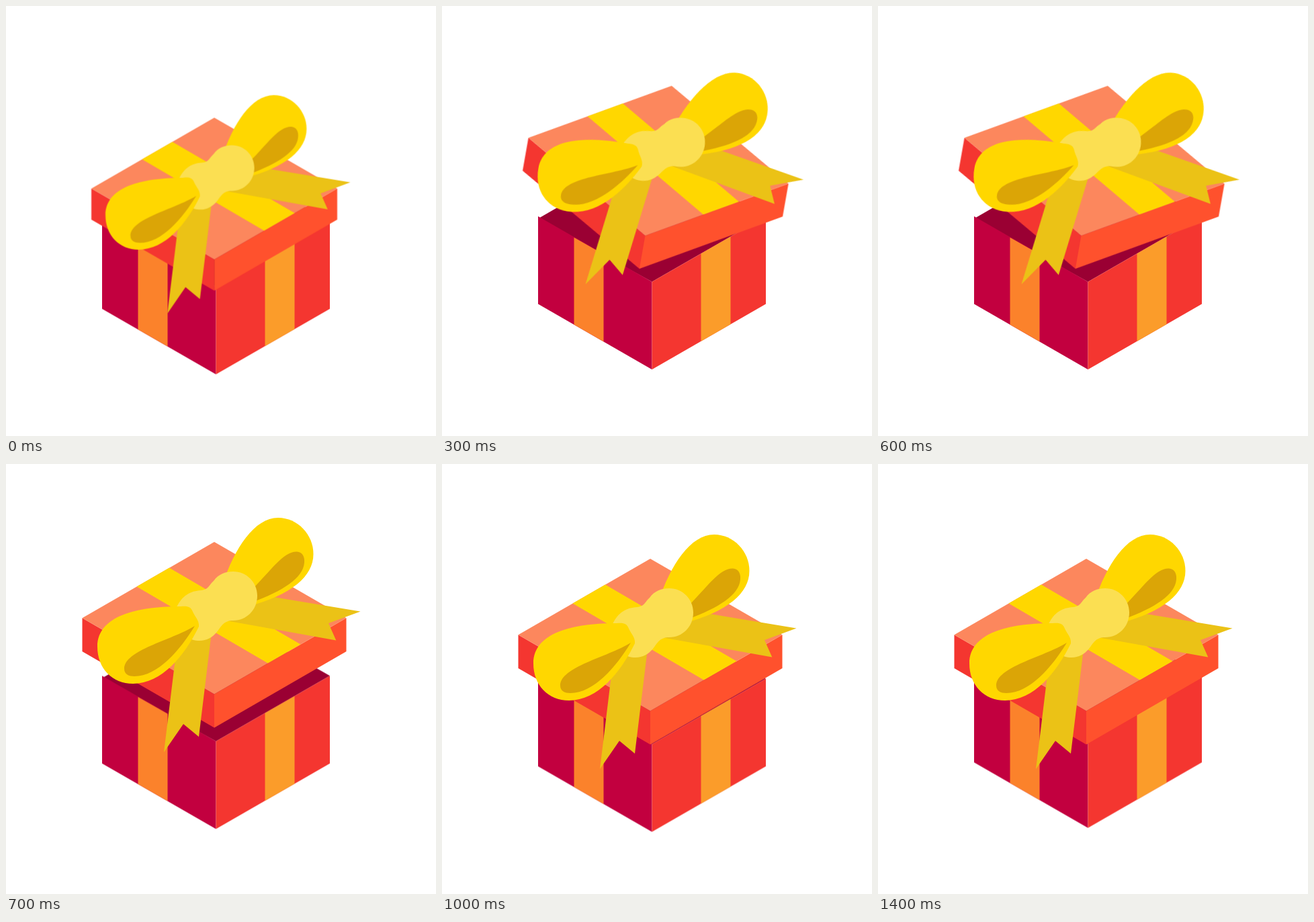
These frames come from a looping animation (640x640 px, 2.4 s). An HTML page:

```html
<!DOCTYPE html>
<html lang="en">
<head>
<meta charset="utf-8">
<title>Gift box</title>
<style>
  html, body { margin: 0; width: 100%; height: 100%; overflow: hidden; background: #fff; }
  svg { display: block; width: 100vw; height: 100vh; }
  .gold { fill: #ffd700; }
  .shade { fill: #dba506; }
  .tail { fill: #ebc216; }
</style>
</head>
<body>
<svg viewBox="0 0 640 640">
  <g id="box">
    <path fill="#9a0033" d="M143 316.5 314.5 217.5 482 313 312.5 410.5Z"/>
    <path fill="#c2003f" d="M143 313 312.5 410.5V541L143 443.5Z"/>
    <path fill="#f43630" d="M312.5 410.5 482 313V443.5L312.5 541Z"/>
    <path fill="#fb822b" d="M196.5 344.5 240.5 369.5V499.5L196.5 474.2Z"/>
    <path fill="#fb9c2a" d="M385.5 368.5 429.5 343.2V473.7L385.5 499Z"/>
  </g>
  <g id="lid">
    <path fill="#f43630" d="M113.5 254.3 310 367.6V417.5L113.5 304Z"/>
    <path fill="#ff512d" d="M310 367.6 506.5 254.3V304L310 417.5Z"/>
    <path fill="#fc875d" d="M113.5 254.3 310 141 506.5 254.3 310 367.6Z"/>
    <path class="gold" d="M194.5 207.6 243 179.6 438.5 293.5 389.7 321.6Z"/>
    <path class="tail" d="M350 215 527.5 244.5 480 262 491.3 287.5 330 258.5Z"/>
    <path class="tail" d="M255 290 306 275 287 431 264 412 235 454Z"/>
    <path class="gold" d="M322 205C340 150 370 105 405 105C434 105 457.5 130 457.5 159C457.5 192 425 220 360 237Z"/>
    <path class="shade" d="M366 212C395 183 413 155 433 155.5C441 156 445 163 444 172C442 195 412 214 366 231Z"/>
    <path fill="#fbdf52" d="M253 240C262 220 275 214 290 213C302 212 302 205 309 199C316 189 327 185 338 185C358 185 374 201 374 221C374 242 358 258 338 258C324 258 321 266 314 275C307 283 299 288 288 288C280 288 276 286 270 283Z"/>
    <path class="gold" d="M260 237C205 237 136 247 136 297C136 329 158 352 189 352C232 352 266 310 287 267C288 258 281 252 278 245C275 237 270 236 260 237Z"/>
    <path class="shade" d="M281 266C245 288 176 302 176 330C176 338 183 341 191 341C226 341 259 302 281 266Z"/>
  </g>
</svg>
<script>
  const LOOP = 2400, STEP = 100;
  const PIVOT = { x: 310, y: 324.25 };

  // One row per step: lid turn, lid drop, lid size, box drop
  const opening = [
    [0, 12.5, 0.931, 7.2],
    [0, -12.4, 0.977, 4.9],
    [0, -25, 1, 2.2],
    [10, -25, 1, 0],
    [-5, -25, 1, -3]
  ];
  const settling = [6.5, 5.2, 3.7, 2.1, 0.6].map(drop => [0, 0, 1, drop]);
  const poses = [...opening, ...[...opening].reverse(), ...settling];

  const lidPose = ([turn, drop, size]) =>
    `translate(${PIVOT.x}px, ${PIVOT.y + drop}px) rotate(${turn}deg) ` +
    `scale(${size}) translate(${-PIVOT.x}px, ${-PIVOT.y}px)`;
  const boxPose = pose => `translate(0px, ${pose[3]}px)`;

  function play(id, toTransform) {
    const frames = poses.map((pose, i) => ({
      offset: i * STEP / LOOP,
      transform: toTransform(pose),
      easing: 'steps(1, end)'
    }));
    frames.push({ offset: 1, transform: toTransform(poses[poses.length - 1]) });
    document.getElementById(id).animate(frames, { duration: LOOP, iterations: Infinity });
  }

  play('lid', lidPose);
  play('box', boxPose);
</script>
</body>
</html>
```
